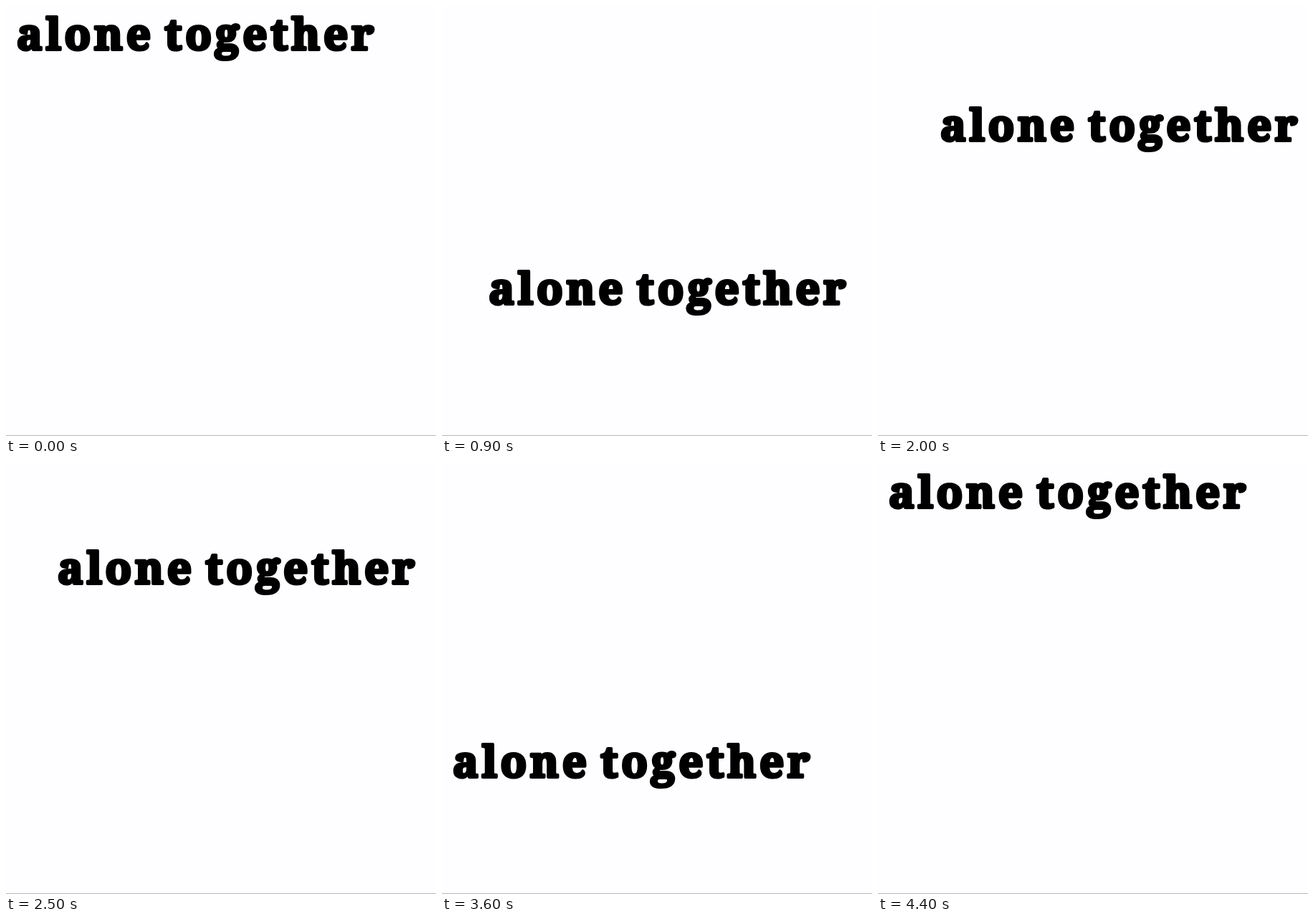
Write an HTML page with a canvas that moves like this. It is 600x600 px and loops after 4800 ms.

```html
<!DOCTYPE html>
<html lang="en">
<head>
<meta charset="utf-8">
<title>alone together</title>
<style>
  html, body { margin: 0; width: 100%; height: 100%; overflow: hidden; background: #fefdff; }
  canvas { display: block; width: 600px; height: 600px; }
</style>
</head>
<body>
<canvas id="stage" width="600" height="600" role="img" aria-label="alone together"></canvas>
<script>
const ctx = document.getElementById('stage').getContext('2d');
const TEXT = 'alone together';

// Motion, in ms and px
const LOOP = 4800;
const STEP = 100;
const REST = 300;
const FIRST_LEG = 190;
const LEG_PERIOD = 1049;
const LEG_TRAVEL = 1015;
const RANGE_X = 72;
const RANGE_Y = 508;

// Lettering: heavy and soft-cornered through a round outline
const LEFT = 15;
const BASELINE = 61;
const INK_WIDTH = 500;
const OUTLINE = 4;
const WORD_SPACING = -6;

ctx.font = '900 60px "Noto Serif", serif';
ctx.lineJoin = 'round';
ctx.lineWidth = OUTLINE;
const ink = ctx.measureText(TEXT);
const naturalWidth = ink.actualBoundingBoxLeft + ink.actualBoundingBoxRight + OUTLINE + WORD_SPACING;
ctx.letterSpacing = `${(INK_WIDTH - naturalWidth) / (TEXT.length - 1)}px`;
ctx.wordSpacing = `${WORD_SPACING}px`;
const startX = LEFT + OUTLINE / 2 + ink.actualBoundingBoxLeft;

// Legs alternate: diagonal to the opposite side going down, then straight up
function offsetAt(time) {
  if (time < REST) return { x: 0, y: 0 };
  const leg = Math.min(3, Math.floor((time - FIRST_LEG) / LEG_PERIOD));
  const progress = Math.min(1, (time - FIRST_LEG - leg * LEG_PERIOD) / LEG_TRAVEL);
  const goingDown = leg % 2 === 0;
  const across = goingDown ? progress : 1;
  return {
    x: RANGE_X * (leg < 2 ? across : 1 - across),
    y: RANGE_Y * (goingDown ? progress : 1 - progress)
  };
}

function draw() {
  const time = Math.floor(performance.now() % LOOP / STEP) * STEP;
  const { x, y } = offsetAt(time);

  ctx.fillStyle = '#fefdff';
  ctx.fillRect(0, 0, 600, 600);
  ctx.fillStyle = '#b8b8b8';
  ctx.fillRect(0, 599, 600, 1);

  ctx.fillStyle = ctx.strokeStyle = '#000';
  ctx.fillText(TEXT, startX + x, BASELINE + y);
  ctx.strokeText(TEXT, startX + x, BASELINE + y);

  requestAnimationFrame(draw);
}
draw();
</script>
</body>
</html>
```
